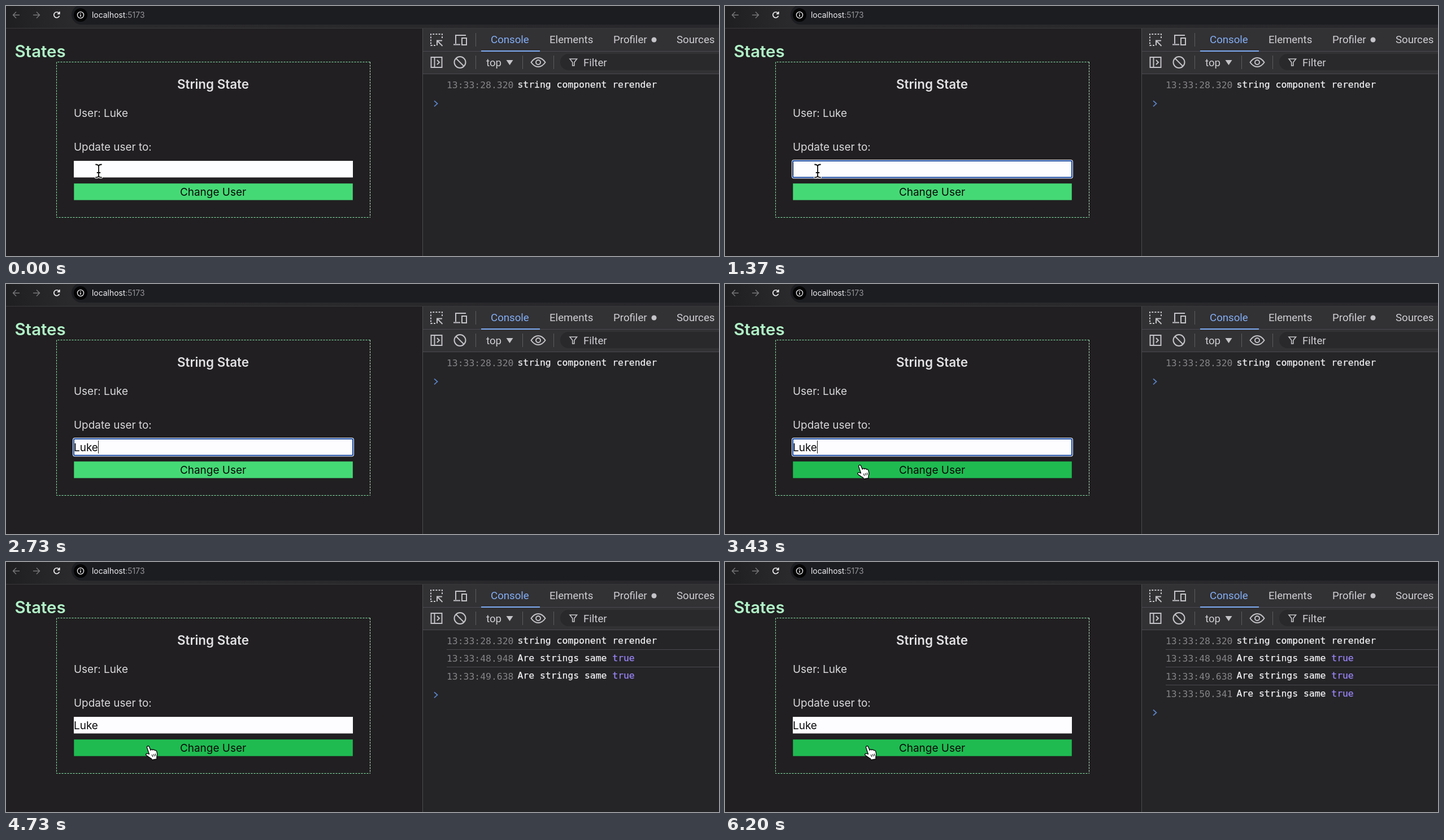
Write an HTML page that moves like this. It is 1262 px wide and 444 px high and loops after 6.23 s.

```html
<!DOCTYPE html>
<html lang="en">
<head>
<meta charset="utf-8">
<title>States</title>
<style>
  html, body { margin: 0; width: 100%; height: 100%; overflow: hidden; background: #211f21; }
  svg { display: block; width: 1262px; height: 444px; }
  .page { font: 18.95px Inter, sans-serif; fill: #dad9dc; }
  .page .title { font-size: 29.4px; font-weight: 600; fill: #b1f3c8; }
  .page .head { font-size: 22.4px; font-weight: 600; fill: #e2e1e4; }
  .page .dark { fill: #080809; }
  .tools { font: 18.65px Roboto, sans-serif; fill: #cfced2; }
  .log { font: 16.4px "DejaVu Sans Mono", monospace; fill: #f3f2f5; stroke: #f3f2f5; stroke-width: .25; }
  .log .time { fill: #858487; stroke: none; }
  .log .bool { fill: #9a85f8; stroke: #9a85f8; }
  .icon { fill: none; stroke: #c4c3c7; stroke-width: 2; }
  .rule { stroke: #4b4a4e; stroke-width: 1; }
  .dash { fill: none; stroke: #8beeb0; stroke-dasharray: 3 2; }
</style>
</head>
<body>
<svg viewBox="0 0 1262 444">
  <defs>
    <linearGradient id="bar" x2="1" y2="0">
      <stop offset="0" stop-color="#1f1e20"/>
      <stop offset=".09" stop-color="#2a292b"/>
      <stop offset="1" stop-color="#28272b"/>
    </linearGradient>
  </defs>
  <rect width="1262" height="444" fill="#211f21"/>

  <!-- address bar -->
  <rect width="1262" height="39" fill="url(#bar)"/>
  <rect x="116" y="-2" width="1170" height="35" rx="17.5" fill="#1b1d21"/>
  <path d="M0 39.5H1262" stroke="#39383b"/>
  <g fill="none" stroke-width="1.4">
    <path stroke="#77767a" d="M24 16H12.5M18 10.5L12.5 16L18 21.5M48 16H59.5M54 10.5L59.5 16L54 21.5"/>
    <path stroke="#f2f1f4" stroke-width="1.7" d="M94 13A5 5 0 1 0 94.5 17.5M94.8 10V13.8H91"/>
  </g>
  <circle cx="132" cy="16" r="12" fill="#050506"/>
  <circle cx="132" cy="16" r="5.6" fill="none" stroke="#f2f1f4" stroke-width="1.3"/>
  <path d="M132 15V19M132 12.6V14" stroke="#f2f1f4" stroke-width="1.5"/>
  <text x="152" y="21" font-family="Inter, sans-serif" font-size="13.9" fill="#f0eff2">localhost<tspan fill="#97969a">:5173</tspan></text>

  <!-- page -->
  <g class="page">
    <text class="title" x="15.5" y="90.5">States</text>
    <path class="dash" d="M644.5 99.5H89.5V375.5H644.5"/>
    <path class="dash" d="M644.5 99.5V375.5" style="stroke:#c9f3d6"/>
    <text class="head" x="366.5" y="146.5" text-anchor="middle">String State</text>
    <text x="120" y="197">User: <tspan id="user"></tspan></text>
    <text x="120" y="257">Update user to:</text>
    <rect x="120" y="275" width="494" height="29.5" fill="#fdfcff"/>
    <g id="focus">
      <rect x="118" y="273" width="498" height="33.5" rx="4" fill="#f4f6ff"/>
      <rect x="120" y="275" width="494" height="29.5" rx="2" fill="#fdfcff" stroke="#17489f" stroke-width="2"/>
    </g>
    <text class="dark" id="field" x="120" y="296.5"></text>
    <path id="caret" d="M.5 278V301" stroke="#111"/>
    <rect id="button" x="120.3" y="315.2" width="493.5" height="29.5"/>
    <text class="dark" x="366.5" y="336.5" text-anchor="middle">Change User</text>
  </g>

  <!-- developer tools -->
  <rect x="738" y="40" width="524" height="404" fill="#252427"/>
  <rect x="738" y="40" width="524" height="80" fill="#323134"/>
  <path class="rule" d="M738 80.5H1262M738 120.5H1262M737.5 40V444"/>
  <path d="M831.5 48V72M831.5 88V112M914.5 88V112M969.5 88V112" stroke="#5c5b5f"/>
  <path d="M841 80H945" stroke="#7facf6" stroke-width="2"/>
  <rect x="981" y="85" width="300" height="29" rx="14.5" fill="#29282b"/>
  <g class="icon">
    <path stroke-dasharray="3 2.2" d="M760 70H752V50H772V58"/>
    <path d="M772.5 71L763.5 62M763 70V61.5H772"/>
    <path d="M796 67V52H814M792 68.5H804"/>
    <rect x="807" y="57" width="8" height="12"/>
    <rect x="752.5" y="91" width="19" height="18"/>
    <path d="M758.5 91V109M763 96L767 100L763 104"/>
    <circle cx="803.5" cy="100" r="10"/>
    <path d="M796.5 93L810.5 107"/>
    <path d="M929.5 100Q935 92 942 92T954.5 100Q949 108 942 108T929.5 100Z"/>
    <circle cx="942" cy="100" r="4"/>
    <path d="M998 94H1010.5L1005.8 100V106H1002.7V100Z" stroke-width="1.6"/>
  </g>
  <path d="M885.5 96H897.5L891.5 105Z" fill="#c4c3c7"/>
  <circle cx="1147" cy="60" r="4.5" fill="#c4c3c7"/>
  <g class="tools">
    <text x="858" y="66" style="fill:#83aef5">Console</text>
    <text x="962" y="66">Elements</text>
    <text x="1075" y="66">Profiler</text>
    <text x="1187" y="66">Sources</text>
    <text x="850" y="106.5">top</text>
    <text x="1022" y="106.5">Filter</text>
  </g>
  <g class="log" id="log"></g>
  <path id="prompt" d="M758 -5L763.5 0L758 5" fill="none" stroke="#5a83c4" stroke-width="1.8"/>

  <!-- pointer -->
  <g id="ring" fill="none">
    <circle r="44.4" stroke="#f0eff2" stroke-width="5.4"/>
    <circle r="44.4" stroke="#060607" stroke-width="3"/>
  </g>
  <g id="beam" fill="none" stroke-linecap="round"></g>
  <g id="hand" stroke="#0a0a0b" stroke-width="1.4" stroke-linejoin="round">
    <path fill="#fff" d="M-2.5 .5C-3.2 -2 .5 -3.3 1.6 -.7L4.2 5.5C4 3.5 6.8 3 7.8 5C8.3 3.6 10.8 3.8 11.5 5.8C12.4 4.8 14.3 5.6 14.8 7.5C16 11.5 16.2 14.5 14.8 17.5L15 21L6.5 22.5L5.3 20.2C2 18.5 -.5 16.5 -3.4 14.6C-5.6 12.8 -3.6 10.4 -1 11.4L1.4 12.2Z"/>
    <path stroke-width="1.1" d="M6.3 13L7.7 17M9.3 12.2L10.6 16.2M12.2 11.5L13.2 15.5"/>
  </g>
</svg>
<script>
const LOOP = 6230;
const NAME = "Luke";
const KEYS = [1500, 1780, 2080, 2340];
const FOCUS = 300;
const CLICKS = [3910, 4600, 5303];
const HOLD = 130;
const MOVE = { from: [164, 293], to: [252, 329], start: 2900, end: 3600 };
const ROW = 31.4;

const $ = id => document.getElementById(id);
const show = (id, on) => $(id).setAttribute("display", on ? "inline" : "none");
const place = (id, x, y) => $(id).setAttribute("transform", `translate(${x} ${y})`);
const ease = p => p * p * (3 - 2 * p);
const clamp = p => Math.min(1, Math.max(0, p));

// The I-beam is a dark stroke over a wider light one.
const stem = (color, width) => `<path stroke="${color}" stroke-width="${width}"
  d="M-5 -11.5Q0 -11.5 0 -8Q0 -11.5 5 -11.5M0 -8V8M-5 11.5Q0 11.5 0 8Q0 11.5 5 11.5M-2.5 3H2.5"/>`;
$("beam").innerHTML = stem("#fff", 4) + stem("#0a0a0b", 1.8);

const same = 'Are strings same <tspan class="bool">true</tspan>';
const stamps = ["28.320", "48.948", "49.638", "50.341"];
$("log").innerHTML = stamps.map((s, i) => {
  const at = y => Math.floor(y + i * ROW);
  const line = i ? `<path class="rule" d="M780 ${at(124) + .5}H1262"/>` : "";
  return `<g id="row${i}">${line}
    <text class="time" x="780" y="${at(146.5)}">13:33:${s}</text>
    <text x="905.5" y="${at(145)}">${i ? same : "string component rerender"}</text></g>`;
}).join("");
$("user").textContent = NAME;

function draw(t) {
  const typed = KEYS.filter(k => t >= k).length;
  const logged = CLICKS.filter(c => t >= c).length;
  const focused = t >= FOCUS && t < CLICKS[0] - HOLD;

  const p = ease(clamp((t - MOVE.start) / (MOVE.end - MOVE.start)));
  const [x, y] = MOVE.from.map((a, i) => a + (MOVE.to[i] - a) * p);
  const hover = y > 311;

  $("field").textContent = NAME.slice(0, typed);
  show("focus", focused);
  const since = typed ? KEYS[typed - 1] : FOCUS;
  show("caret", focused && (t - since) % 1000 < 500);
  place("caret", Math.round(120 + (typed ? $("field").getComputedTextLength() : 0)), 0);
  $("button").setAttribute("fill", hover ? "#1fbb51" : "#45d975");

  stamps.forEach((s, i) => show("row" + i, i <= logged));
  place("prompt", 0, 173.3 + logged * ROW);

  // The pointer hides while typing and returns when it moves.
  const visible = t < KEYS[0] || t >= MOVE.start;
  show("beam", visible && !hover);
  show("hand", hover);
  place("beam", x, y);
  place("hand", x, y);
  const pressed = (t >= FOCUS && t < FOCUS + HOLD) || CLICKS.some(c => t >= c - HOLD && t < c);
  show("ring", pressed);
  place("ring", x - 6, y - 6.4);
}

const begin = performance.now();
function tick(now) {
  draw(Math.max(0, now - begin) % LOOP);
  requestAnimationFrame(tick);
}
draw(0);
requestAnimationFrame(tick);
</script>
</body>
</html>
```
